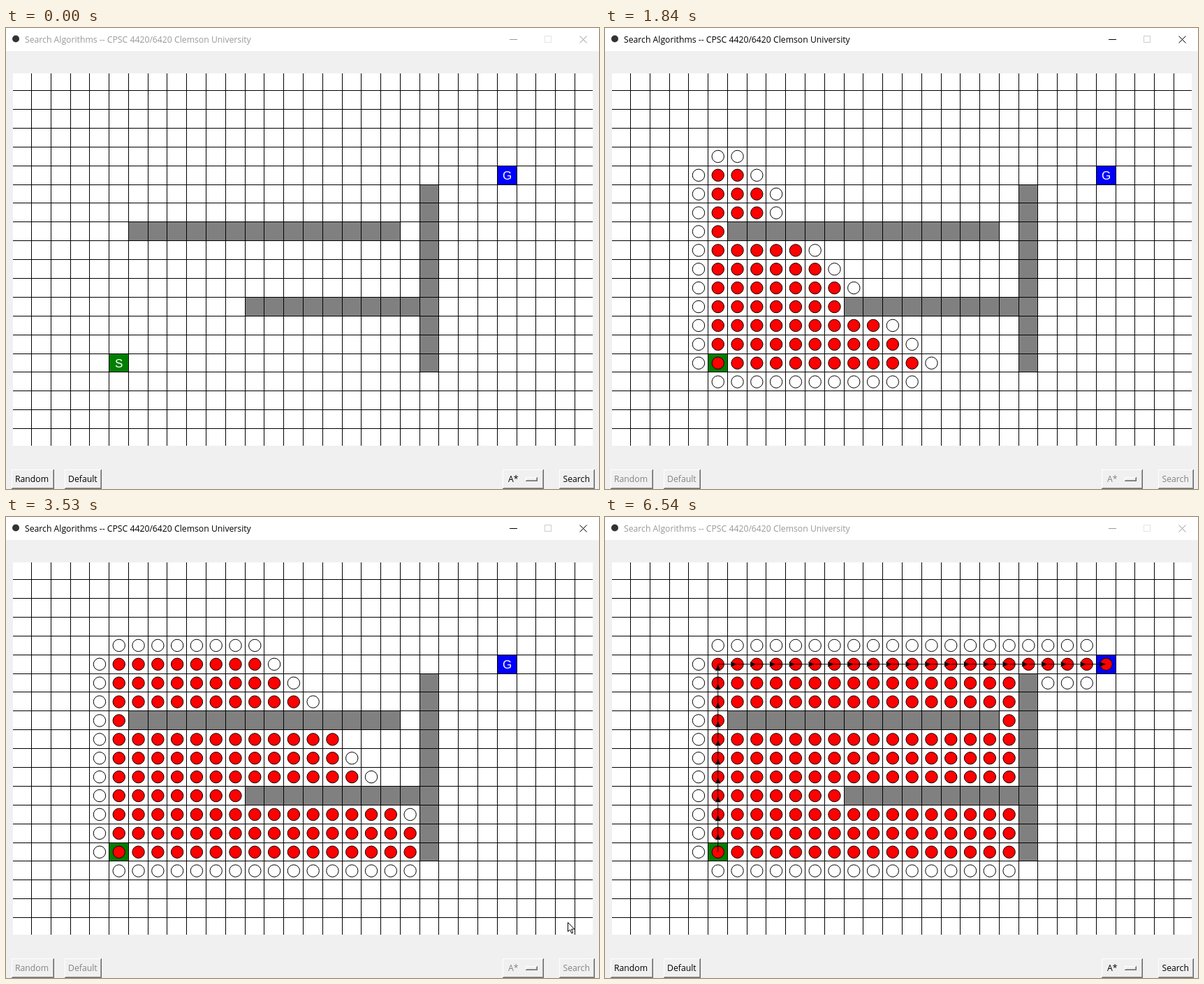
An HTML page with a canvas that plays this animation: 849x660 px, repeating every 6.62 s.

```html
<!DOCTYPE html>
<html lang="en">
<head>
<meta charset="utf-8">
<title>Search Algorithms</title>
<style>
html, body { margin: 0; width: 100%; height: 100%; overflow: hidden; background: #f0f0f0; }
canvas { display: block; }
</style>
</head>
<body>
<canvas id="stage" width="849" height="660"></canvas>
<script>
const ctx = document.getElementById('stage').getContext('2d');
const LOOP = 6620, STEP = 76.9;
const COLS = 30, ROWS = 20;
const START = [5, 15], GOAL = [25, 5];
const UI_FONT = '12.23px "Open Sans", sans-serif';

// Steps at which the window, the search and the path change.
const PRESS = 5, RUN = 6, DONE = 67, BLUR = 85;

// [step, number of expanded cells]; the fraction counts neighbours opened so far.
const PROGRESS = [[5, 0], [9, 14], [17, 44], [32, 86], [46, 118.4], [65, 155.4], [66, 157.1]];

// [step, x, y] of the pointer; without a position it is out of the window.
const POINTER = [[0], [1, 822, 642], [2, 824, 638], [7], [29, 820, 575], [30, 804, 580],
  [71, 735, 606], [72, 650, 632], [73], [79, 816, 659], [80]];

const lineX = c => Math.floor(8.7 + 27.786 * c);
const lineY = r => Math.floor(62.7 + 26.89 * r);
const midX = c => 8.6 + 27.79 * (c + .5) + .3;
const midY = r => 62.7 + 26.89 * (r + .5) + .2;

const isWall = (c, r) =>
  (r === 8 && c >= 6 && c <= 19) ||
  (r === 12 && c >= 12 && c <= 20) ||
  (c === 21 && r >= 6 && r <= 15);

// A* with the Manhattan distance expands the cells on shortest routes, nearest first.
const order = [];
for (let r = GOAL[1]; r <= START[1]; r++)
  for (let c = START[0]; c <= (r === GOAL[1] ? GOAL[0] : 20); c++)
    if (!isWall(c, r)) order.push([c, r]);
const cost = ([c, r]) => c - START[0] + START[1] - r;
order.sort((a, b) => cost(a) - cost(b) || a[1] - b[1]);

function expandedAt(step) {
  if (step <= PROGRESS[0][0]) return 0;
  for (let i = 1; i < PROGRESS.length; i++) {
    const [s0, n0] = PROGRESS[i - 1], [s1, n1] = PROGRESS[i];
    if (step <= s1) return n0 + (n1 - n0) * (step - s0) / (s1 - s0);
  }
  return PROGRESS[PROGRESS.length - 1][1];
}

function box(x, y, w, h, color) {
  ctx.fillStyle = color;
  ctx.fillRect(x, y, w, h);
}

function label(text, x, y, color, font = UI_FONT, align = 'left') {
  ctx.font = font;
  ctx.textAlign = align;
  ctx.fillStyle = color;
  ctx.fillText(text, x, y);
}

function shape(points, fill, stroke) {
  ctx.beginPath();
  points.forEach(([x, y]) => ctx.lineTo(x, y));
  ctx.closePath();
  ctx.fillStyle = fill;
  ctx.fill();
  if (stroke) {
    ctx.strokeStyle = stroke;
    ctx.stroke();
  }
}

function segment(x0, y0, x1, y1, color) {
  ctx.strokeStyle = color;
  ctx.beginPath();
  ctx.moveTo(x0, y0);
  ctx.lineTo(x1, y1);
  ctx.stroke();
}

function relief(x, y, w, h, pressed) {
  const light = pressed ? '#696969' : '#fff', dark = pressed ? '#fff' : '#696969';
  box(x, y, w, h, dark);
  box(x, y, w - 1, h - 1, light);
  box(x + 1, y + 1, w - 2, h - 2, pressed ? '#f0f0f0' : '#a0a0a0');
  box(x + 1, y + 1, w - 3, h - 3, '#f0f0f0');
}

function button(text, x, w, textX, enabled, pressed) {
  relief(x, 632, w, 28, pressed);
  const shift = pressed ? 1 : 0;
  label(text, textX + shift, 650 + shift, enabled ? '#000' : '#838383');
}

function drawTitleBar(active) {
  const ink = active ? '#000' : '#999';
  box(0, 0, 849, 33, '#fff');
  ctx.fillStyle = '#333';
  ctx.beginPath();
  ctx.arc(14, 15.5, 5, 0, 7);
  ctx.fill();
  label('Search Algorithms -- CPSC 4420/6420 Clemson University', 27, 20.5, ink);
  segment(721, 16.5, 732, 16.5, ink);
  ctx.strokeStyle = active ? '#ccc' : '#e4e4e4';
  ctx.strokeRect(771.5, 11.5, 9, 9);
  segment(821.5, 11.5, 831.5, 21.5, ink);
  segment(831.5, 11.5, 821.5, 21.5, ink);
}

function drawCell(c, r, color, text) {
  box(lineX(c), lineY(r), lineX(c + 1) - lineX(c), lineY(r + 1) - lineY(r), color);
  if (text) label(text, midX(c), midY(r) + 6, '#fff', '17px "Liberation Sans", sans-serif', 'center');
}

function drawGrid() {
  box(10, 65, 830, 533, '#fff');
  for (let r = 0; r < ROWS; r++)
    for (let c = 0; c < COLS; c++)
      if (isWall(c, r)) drawCell(c, r, '#808080');
  drawCell(...START, '#008000', 'S');
  drawCell(...GOAL, '#0000ff', 'G');
  for (let c = 1; c < COLS; c++) box(lineX(c), 65, 1, 533, '#000');
  for (let r = 1; r < ROWS; r++) box(10, lineY(r), 830, 1, '#000');
}

function drawNode(c, r, color) {
  ctx.beginPath();
  ctx.arc(midX(c), midY(r), 8.7, 0, 7);
  ctx.fillStyle = color;
  ctx.fill();
  ctx.strokeStyle = '#000';
  ctx.stroke();
}

function drawSearch(count) {
  const nodes = new Map();
  const mark = (c, r, color) => nodes.set(c + ',' + r, [c, r, color]);
  order.forEach(([c, r], i) => {
    if (i >= count) return;
    mark(c, r, '#f00');
    [[0, -1], [1, 0], [0, 1], [-1, 0]].forEach(([dc, dr], j) => {
      const x = c + dc, y = r + dr;
      if (i + (j + 1) / 4 <= count && !isWall(x, y) && !nodes.has(x + ',' + y)) mark(x, y, '#fff');
    });
  });
  nodes.forEach(node => drawNode(...node));
}

function drawArrow(c0, r0, c1, r1) {
  const x = midX(c1), y = midY(r1), dx = c1 - c0, dy = r1 - r0;
  segment(midX(c0), midY(r0), x - dx * 4, y - dy * 4, '#000');
  const at = (back, side) => [x - dx * back - dy * side, y - dy * back + dx * side];
  shape([at(0, 0), at(10, 3.5), at(8, 0), at(10, -3.5)], '#000');
}

function drawPath() {
  for (let r = START[1]; r > GOAL[1]; r--) drawArrow(START[0], r, START[0], r - 1);
  for (let c = START[0]; c < GOAL[0]; c++) drawArrow(c, GOAL[1], c + 1, GOAL[1]);
}

function drawPointer(step) {
  const [, x, y] = POINTER.filter(p => p[0] <= step).pop();
  if (x === undefined) return;
  const outline = [[0, 0], [0, 13], [3, 10.4], [5.3, 15.5], [7.3, 14.6], [5.1, 9.7], [9.2, 9.4]];
  shape(outline.map(([px, py]) => [x + px + .5, y + py + .5]), '#fff', '#000');
}

function draw(step) {
  const enabled = step < RUN || step >= DONE;
  ctx.lineWidth = 1;
  box(0, 0, 849, 660, '#f0f0f0');
  drawTitleBar(step >= PRESS && step < BLUR);
  drawGrid();
  drawSearch(expandedAt(step));
  if (step >= DONE) drawPath();
  button('Random', 8, 61, 13, enabled);
  button('Default', 84, 53, 89, enabled);
  button('A*', 711, 59, 719, enabled);
  relief(744, 643, 17, 6);
  button('Search', 792, 51, 797.5, enabled, step === PRESS);
  drawPointer(step);
}

function tick() {
  draw(Math.floor((performance.now() % LOOP + 12) / STEP));
  requestAnimationFrame(tick);
}
tick();
</script>
</body>
</html>
```
